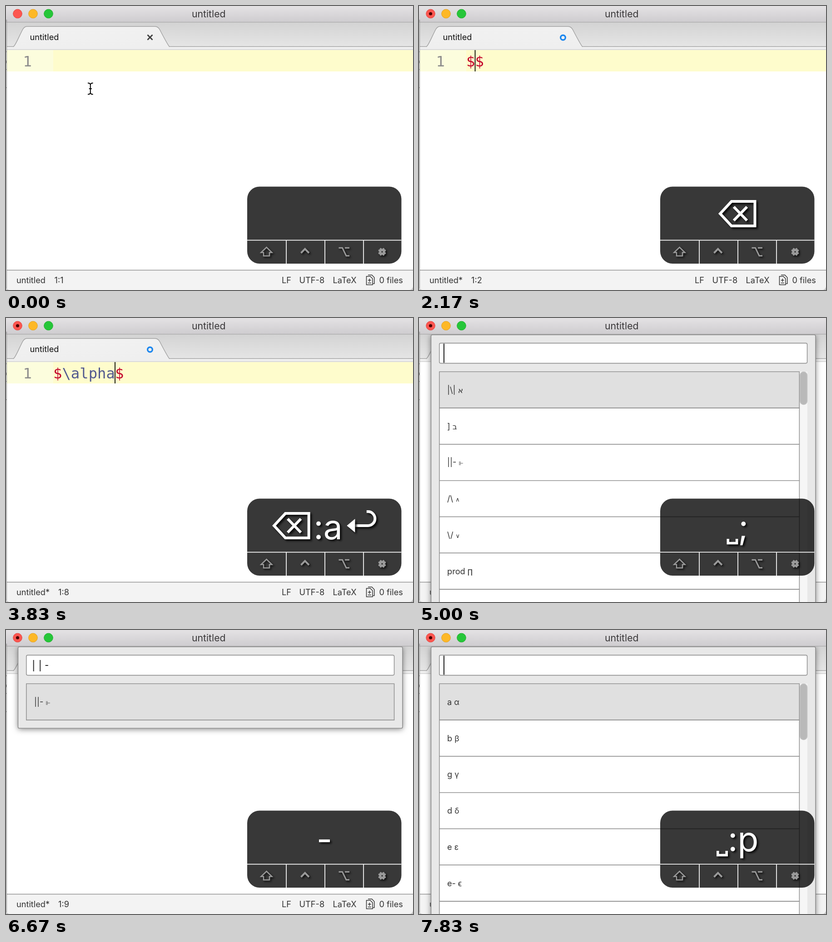
An HTML page with a canvas for the animation above (8000 ms loop, 896x625 px).

```html
<!DOCTYPE html>
<html lang="en">
<head>
<meta charset="utf-8">
<title>Editor</title>
<style>
  html, body { margin: 0; width: 100%; height: 100%; overflow: hidden; background: #fff; }
  canvas { display: block; }
</style>
</head>
<body>
<canvas id="stage" width="896" height="625"></canvas>
<script>
const c = document.getElementById('stage').getContext('2d');
const LOOP = 8000, BLINK = 330, ROW = 79.8, CELL = 19.42;
const SANS = 'Inter, Roboto, sans-serif';
const MONO = '"DejaVu Sans Mono", monospace';
const SYMBOL = '"DejaVu Sans", sans-serif';

// Each list: scroll thumb height and rows of [keys, symbol, symbol size, font]
const greek = {
  thumb: 124,
  rows: [['a', 'α'], ['b', 'β'], ['g', 'γ'], ['d', 'δ'], ['e', 'ε'], ['e-', 'ϵ']]
    .map(r => [...r, 17.5, SANS])
};
const symbols = {
  thumb: 73,
  rows: [['|\\|', 'א', 17], [']', 'ב', 17], ['||-', '⊩', 12], ['/\\', '∧', 13], ['\\/', '∨', 13], ['prod', '∏', 15]]
    .map(r => [...r, SYMBOL])
};

// Each step only names what changes
const steps = [
  { t: 0, text: '', col: 1, list: null, query: '', filter: '', hud: '', mod: '', selected: false, key: 170 },
  { t: 165, mod: '⌘' },
  { t: 825, text: '$ $', col: 3, selected: true },
  { t: 995, mod: '' },
  { t: 2160, text: '$$', col: 2, selected: false, hud: '⌫', key: 2160 },
  { t: 2330, mod: '⇧' },
  { t: 2495, hud: '⌫:', list: greek, key: 2495 },
  { t: 2660, mod: '' },
  { t: 2990, hud: '⌫:a', query: 'a', key: 2990 },
  { t: 3165, filter: 'a' },
  { t: 3665, text: '$\\alpha$', col: 8, hud: '⌫:a↵', list: null, query: '', filter: '', key: 3665 },
  { t: 4495, text: '$\\alpha $', col: 9, hud: '␣', key: 4495 },
  { t: 4825, hud: '␣;' },
  { t: 4990, list: symbols, key: 4990 },
  { t: 5825, mod: '⇧' },
  { t: 5990, query: '|', filter: '|', hud: '|', key: 5990 },
  { t: 6160, query: '||', filter: '||', hud: '||', key: 6160 },
  { t: 6325, query: '||-', filter: '||-', hud: '-', mod: '', key: 6325 },
  { t: 6825, text: '$\\alpha \\Vdash$', col: 15, hud: '-↵', list: null, query: '', filter: '', key: 6825 },
  { t: 7495, text: '$\\alpha \\Vdash $', col: 16, hud: '␣', key: 7495 },
  { t: 7660, hud: '␣:' },
  { t: 7825, hud: '␣:p', list: greek, key: 7825 }
];

function stateAt(t) {
  const s = {};
  for (const step of steps) {
    if (step.t > t) break;
    if ('hud' in step) s.hudTime = step.t;
    Object.assign(s, step);
  }
  s.caret = t >= s.key && Math.floor((t - s.key) / BLINK) % 2 === 0;
  return s;
}

function rect(x, y, w, h, fill) {
  c.fillStyle = fill;
  c.fillRect(x, y, w, h);
}

function box(x, y, w, h, r, fill, stroke) {
  c.beginPath();
  c.roundRect(x, y, w, h, r);
  paint(fill, stroke, 1.6);
}

function paint(fill, stroke, width) {
  if (fill) { c.fillStyle = fill; c.fill(); }
  if (stroke) { c.strokeStyle = stroke; c.lineWidth = width; c.stroke(); }
}

function path(d, stroke, width, fill) {
  const p = new Path2D(d);
  if (fill) { c.fillStyle = fill; c.fill(p); }
  if (stroke) { c.strokeStyle = stroke; c.lineWidth = width; c.stroke(p); }
}

function disc(x, y, r, fill, stroke, width) {
  c.beginPath();
  c.arc(x, y, r, 0, 7);
  paint(fill, stroke, width);
}

function label(str, x, y, size, fill, font = SANS) {
  c.font = `${size}px ${font}`;
  c.fillStyle = fill;
  c.fillText(str, x, y);
}

function fade(y0, y1, from, to) {
  const g = c.createLinearGradient(0, y0, 0, y1);
  g.addColorStop(0, from);
  g.addColorStop(1, to);
  return g;
}

function drawFrame(dirty) {
  rect(0, 0, 896, 36, fade(0, 36, '#e4e2e4', '#cecccf'));
  rect(0, 35.2, 896, 1.4, '#a09fa0');
  disc(25.5, 17, 9.8, '#fc5650', '#e2443f', 1);
  disc(59.5, 17, 9.8, '#fdb827', '#e0a024', 1);
  disc(93.5, 17, 9.8, '#26c639', '#1dad2b', 1);
  if (dirty) disc(25.5, 17, 3.6, '#4a0203');
  label('untitled', 409, 25.3, 21.2, '#3a383a');

  rect(0, 36.6, 896, 53, fade(36, 89, '#d3d3d3', '#e5e5e5'));
  rect(0, 89, 896, 7, '#efefef');
  rect(0, 88.6, 896, 1.4, '#a3a3a3');
  rect(0, 95.3, 896, 1.2, '#c6c6c6');
  path('M16 90 C21 86 23 79 36 53 Q40 45 46 45 H328 Q335 45 339 53 C351 76 356 85 360 90',
    '#a3a3a3', 1.5, fade(45, 90, '#f1f1f1', '#efefef'));
  rect(17, 89.8, 342, 2, '#efefef');
  label('untitled', 52.5, 74.8, 18.2, '#111');
  if (dirty) disc(317, 69.5, 5.3, null, '#1a86ee', 3.4);
  else path('M311.5 63.5 L322.5 74.5 M322.5 63.5 L311.5 74.5', '#3c3c3c', 2.8);
}

function drawEditor(s) {
  const active = !s.list && !s.selected;
  if (active) {
    rect(2, 97, 102, 47, '#fcfddd');
    rect(104, 97, 792, 47, '#fefccc');
  }
  label('1', 37.5, 133, 32.25, '#8b8b8b', MONO);
  if (s.selected) rect(122.4, 97, 20.4, 47, '#a6b9d8');
  let at = 0;
  for (const part of s.text.match(/\$|[^$]+/g) || []) {
    label(part, 104 + at * CELL, 133, 32.25, part === '$' ? '#c4062c' : '#52598f', MONO);
    at += part.length;
  }
  if (active && s.caret) rect(103.2 + (s.col - 1) * CELL, 97, 1.8, 47, '#000');
}

function drawStatus(s, dirty) {
  const ink = '#333';
  rect(0, 581, 896, 44, '#f3f3f3');
  rect(0, 580.6, 896, 1.5, '#949494');
  label(dirty ? 'untitled*' : 'untitled', 23, 610, 18.2, ink);
  label('1:' + s.col, dirty ? 115 : 106.5, 610, 18.2, ink);
  if (s.selected) label('(1, 1)', 176, 610, 18.2, ink);
  label('LF', 607, 610, 18.2, ink);
  label('UTF-8', 645.5, 610, 18.2, ink);
  label('LaTeX', 719.5, 610, 18.2, ink);
  label('0 files', 821.5, 610, 18.2, ink);
  path('M793.5 595 H802 L807 600 V613.5 H793.5 Z M797 592 H805.5 L810.8 597.5 V611 H808' +
    ' M800.3 600 V607 M796.8 603.5 H803.8 M796.8 609.5 H803.8', ink, 1.5);
}

function drawEdge() {
  rect(0, 36, 1, 589, '#f5f5f5');
  rect(0.8, 30, 1.2, 595, '#8c8c8c');
  for (const y of [100, 139, 179]) rect(0, y, 2, 1.3, '#777');
  path('M0 120 Q1.5 123 0 126', '#666', 1);
  path('M0 617 Q1 624 8 625 H0 Z', null, 0, '#c9c9c9');
  path('M896 617 Q895 624 888 625 H896 Z', null, 0, '#c9c9c9');
}

function drawPointer() {
  const d = 'M180 169.5 Q185 169.5 185.8 173 Q186.6 169.5 191.6 169.5 M185.8 173 V191' +
    ' M180 194.5 Q185 194.5 185.8 191 Q186.6 194.5 191.6 194.5 M182.8 182 H188.8';
  path(d, '#fff', 4);
  path(d, '#000', 2);
}

function drawPopup(s) {
  const rows = s.list.rows.filter(r => r[0].startsWith(s.filter));
  const long = !s.filter;
  const count = long ? 7 : rows.length;
  const right = long ? 837.4 : 854.6;
  const border = '#949494';

  c.save();
  c.beginPath();
  c.rect(0, 36, 896, 589);
  c.clip();
  c.save();
  c.shadowColor = 'rgba(0,0,0,.5)';
  c.shadowBlur = 13;
  c.shadowOffsetY = 2;
  box(26.5, 37, 846.5, 99.5 + count * ROW, 3, '#e8e8e8');
  c.restore();
  box(26.5, 37, 846.5, 99.5 + count * ROW, 3, null, '#8e8e8e');

  box(44.8, 55.4, 809.8, 44.2, 3, '#fff', border);
  label(s.query, 53.5, 85, 24, '#333', MONO);
  if (s.caret) rect(54 + s.query.length * 14.45, 56.5, 1.8, 42, '#000');

  if (long) {
    rect(838, 118, 17, 507, '#f6f6f6');
    box(839, 118.5, 15.5, s.list.thumb - 1, 7.7, '#b9b9b9', '#c2c2c2');
  }
  for (let i = 0; i < count; i++) {
    const y = 118.3 + i * ROW;
    box(44.8, y, right - 44.8, ROW, 0, i ? '#fff' : '#e0e0e0', border);
    if (!rows[i]) continue;
    const [keys, symbol, size, font] = rows[i];
    label(keys, 62, y + 46.5, 18.2, '#333');
    const x = 62 + c.measureText(keys + ' ').width;
    label(symbol, x, y + 46.5, size, '#333', font);
  }
  c.restore();
}

const hudGlyphs = {
  '⌫': [98, x => path(`M${x + 11} 457 L${x + 36} 430 H${x + 87.5} V484 H${x + 36} Z` +
    ` M${x + 41} 442 l29 30 m0 -30 l-29 30`, '#fff', 6)],
  '↵': [82, x => {
    path(`M${x + 24} 457 H${x + 56} a15.5 15.5 0 0 0 0 -31 H${x + 53}`, '#fff', 6);
    path(`M${x + 9.5} 457 l18 -15 v30 Z`, null, 0, '#fff');
  }],
  '␣': [25.5, x => path(`M${x + 3.3} 486 V495.5 H${x + 22.7} V486`, '#fff', 5.5)]
};

function drawKeys(s, t) {
  const alpha = 1 - Math.min(1, Math.max(0, (t - s.hudTime - 500) / 200));
  if (!s.hud || !alpha) return;
  c.globalAlpha = alpha;
  c.font = `75px ${SANS}`;
  const keys = [...s.hud];
  const widths = keys.map(k => hudGlyphs[k] ? hudGlyphs[k][0] : c.measureText(k).width);
  let x = 701 - widths.reduce((a, b) => a + b, 0) / 2;
  keys.forEach((k, i) => {
    if (hudGlyphs[k]) hudGlyphs[k][1](x);
    else label(k, x, 486.5, 75, '#fff');
    x += widths[i];
  });
  c.globalAlpha = 1;
}

function drawHud(s, t) {
  const tone = key => s.mod === key ? '#fff' : '#9a9a9a';
  box(531, 397.5, 339.5, 169.5, 27, 'rgba(0,0,0,.78)');
  rect(531, 514.6, 339.5, 1.7, '#fff');
  for (const x of [616.2, 701.2, 786.2]) rect(x, 515, 1.7, 52, '#fff');

  c.save();
  c.shadowColor = 'rgba(0,0,0,.85)';
  c.shadowBlur = 4;
  c.shadowOffsetX = c.shadowOffsetY = 2.5;
  path('M573.5 531 L585.5 542.5 H580 V550 H567 V542.5 H561.5 Z', tone('⇧'), 2.5);
  path('M649.5 543.5 L658.2 534.5 L667 543.5', tone('⌃'), 4);
  path('M732.5 532.3 H740.5 L749 549.7 H756 M746 532.3 H756', tone('⌥'), 3);
  let knot = '';
  for (const a of [-1, 1]) {
    knot += `M${828 + a * 4} 533.5 v15 M820.5 ${541 + a * 4} h15 `;
    for (const b of [-1, 1]) {
      const x = 828 + a * 7.2, y = 541 + b * 7.2;
      knot += `M${x - a * 3.2} ${y} A3.2 3.2 0 1 ${a * b > 0 ? 1 : 0} ${x} ${y - b * 3.2} `;
    }
  }
  path(knot, tone('⌘'), 2.5);
  c.shadowOffsetX = c.shadowOffsetY = 3.5;
  drawKeys(s, t);
  c.restore();
}

function draw(t) {
  const s = stateAt(t);
  const dirty = s.text !== '';
  rect(0, 0, 896, 625, '#fff');
  drawFrame(dirty);
  drawEditor(s);
  drawStatus(s, dirty);
  drawEdge();
  if (!dirty) drawPointer();
  if (s.list) drawPopup(s);
  drawHud(s, t);
}

const start = performance.now();
function tick() {
  draw((performance.now() - start) % LOOP);
  requestAnimationFrame(tick);
}
tick();
</script>
</body>
</html>
```
